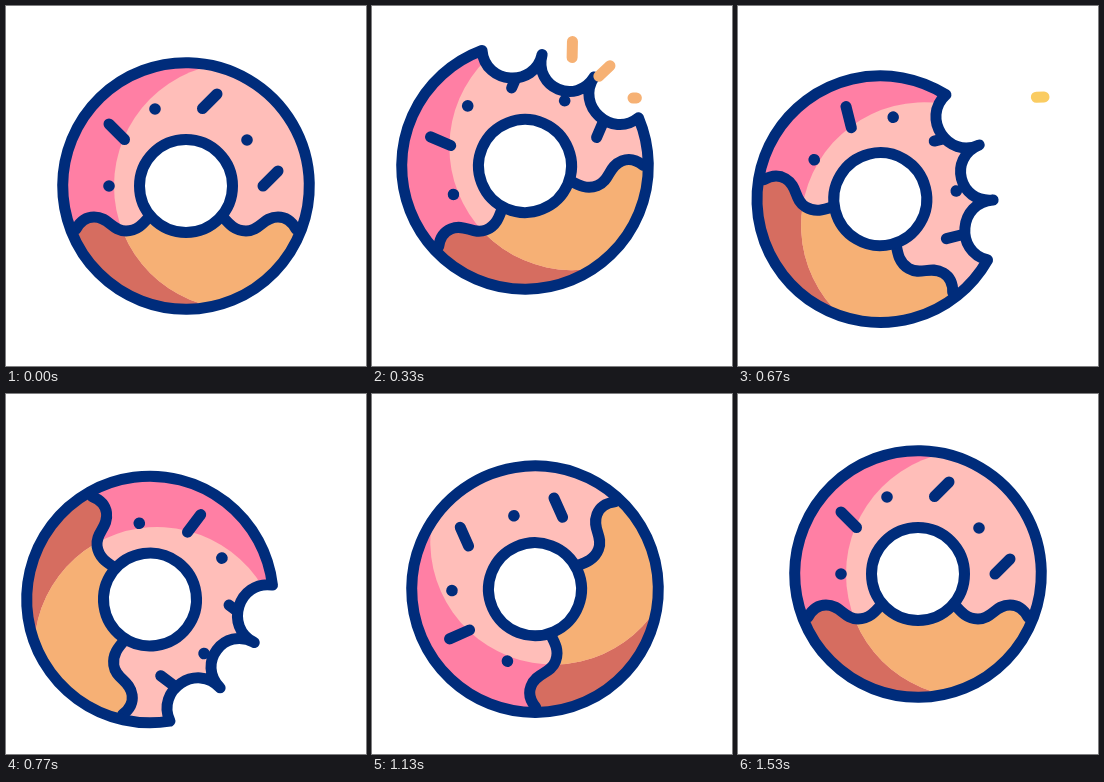
Write an HTML page that moves like this. It is 360 px wide and 360 px high and loops after 2000 ms.

```html
<!DOCTYPE html>
<html lang="en">
<head>
<meta charset="utf-8">
<title>Donut</title>
<style>
  html, body { margin: 0; width: 100%; height: 100%; overflow: hidden; background: #fff; }
  svg { display: block; width: 100vw; height: 100vh; }
  .line { fill: none; stroke: #002c7b; stroke-width: 11; stroke-linecap: round; stroke-linejoin: round; }
  .dots { fill: #002c7b; }
  .crumb { stroke-width: 11; stroke-linecap: round; }
</style>
</head>
<body>
<svg viewBox="0 0 360 360">
  <defs>
    <clipPath id="body"><path class="outline"/></clipPath>
    <clipPath id="lit"><circle cx="51" r="123"/></clipPath>
    <path id="dough" d="M-110 43C-105 34-99 31-92 31C-77 31-74 45-60 45C-49 45-43 38-37 31H37C43 38 49 45 60 45C74 45 77 31 92 31C99 31 105 34 110 43L130 130H-130Z"/>
    <path id="wave" d="M-110 43C-105 34-99 31-92 31C-77 31-74 45-60 45C-49 45-43 38-37 31"/>
  </defs>
  <g id="donut">
    <g clip-path="url(#body)">
      <circle r="130" fill="#ff7fa4"/>
      <use href="#dough" fill="#d66d60"/>
      <g clip-path="url(#lit)">
        <circle r="130" fill="#ffbeb9"/>
        <use href="#dough" fill="#f6b075"/>
      </g>
      <g class="line">
        <use href="#wave"/>
        <use href="#wave" transform="scale(-1 1)"/>
        <path d="M16.5-77.5L31-92M-77-62L-61.5-46.5M77 0L92-15"/>
      </g>
      <g class="dots">
        <circle cx="-31" cy="-77" r="5.8"/>
        <circle cx="61" cy="-46" r="5.8"/>
        <circle cx="-77" cy="0" r="5.8"/>
      </g>
    </g>
    <circle class="line" r="46.5" style="fill:#fff"/>
    <path class="line outline"/>
  </g>
  <g id="crumbs">
    <line class="crumb"/><line class="crumb"/><line class="crumb"/>
  </g>
</svg>
<script>
  const FPS = 30, LOOP = 2000, LAST = 46, R = 123.3;
  const donut = document.getElementById('donut');
  const crumbGroup = document.getElementById('crumbs');
  const crumbLines = [...crumbGroup.children];
  const outlines = document.querySelectorAll('.outline');

  // Keys are [frame, value].
  const xKeys = [[0, 180], [10, 153], [17, 144], [20, 142.3], [23, 144], [29, 152], [34, 163], [46, 180]];
  const yKeys = [[0, 180], [10, 160], [17, 177.5], [23, 205.5], [25, 206.2], [29, 203.7], [34, 195.2], [46, 180]];
  const turnKeys = [[0, 0], [10, -21.7], [17, -7.8], [23, 82], [29, 200], [34, 291], [46, 360]];

  const crumbs = [
    { from: [200, 58], to: [201, 8], start: 6.4 },
    { from: [225, 72], to: [262, 37], start: 7.2 },
    { from: [261, 92], to: [306, 91], start: 9.4 }
  ];

  const clamp = v => Math.min(1, Math.max(0, v));
  const lerp = (a, b, u) => a + (b - a) * u;
  const smooth = u => u * u * (3 - 2 * u);
  const ramp = (f, a, b) => clamp((f - a) / (b - a));

  // Smooth curve through the keys, at rest at both ends.
  function spline(keys, f) {
    const slope = i => {
      if (i === 0 || i === keys.length - 1) return 0;
      const [[a, p], [b, q], [c, r]] = keys.slice(i - 1, i + 2);
      return ((q - p) / (b - a) * (c - b) + (r - q) / (c - b) * (b - a)) / (c - a);
    };
    let i = 0;
    while (i < keys.length - 2 && f > keys[i + 1][0]) i++;
    const [a, p] = keys[i], [b, q] = keys[i + 1];
    const h = b - a, u = clamp((f - a) / h), v = 1 - u;
    return p * v * v * (1 + 2 * u) + q * u * u * (3 - 2 * u)
      + h * u * v * (slope(i) * v - slope(i + 1) * u);
  }

  // Ring outline whose upper right quarter bends into three bites.
  function outline(bite) {
    const nodes = [0, 1, 2, 3].map(i => {
      const a = (-88.7 + 29.13 * i) * Math.PI / 180;
      const r = i % 3 ? lerp(R, 112.8, bite) : R;
      return [r * Math.cos(a), r * Math.sin(a)];
    });
    const along = lerp(0.328, 0.087, bite), depth = lerp(-5.3, 34, bite);
    let d = `M${nodes[0]}`;
    for (let i = 0; i < 3; i++) {
      const [x, y] = nodes[i], [X, Y] = nodes[i + 1];
      const dx = X - x, dy = Y - y, len = Math.hypot(dx, dy);
      const nx = -dy / len * depth, ny = dx / len * depth;
      d += `C${x + dx * along + nx} ${y + dy * along + ny} ${X - dx * along + nx} ${Y - dy * along + ny} ${X} ${Y}`;
    }
    return `${d}A${R} ${R} 0 1 1 ${nodes[0]}Z`;
  }

  function drawCrumb(line, { from, to, start }, f) {
    const head = ramp(f, start, start + 8);
    const tail = ramp(f, start + 2.3, start + 12.3);
    line.style.display = head > 0 && tail < 1 ? '' : 'none';
    [tail, head].forEach((u, i) => {
      line.setAttribute(`x${i + 1}`, lerp(from[0], to[0], u));
      line.setAttribute(`y${i + 1}`, lerp(from[1], to[1], u));
    });
  }

  function draw(now) {
    // The motion steps at 30 pictures per second, then rests.
    const f = Math.min(LAST, Math.floor((now % LOOP + 4) * FPS / 1000));
    const x = spline(xKeys, f), y = spline(yKeys, f), turn = spline(turnKeys, f);
    donut.setAttribute('transform', `translate(${x} ${y}) rotate(${turn})`);

    const d = outline(smooth(ramp(f, 3, 8)) - smooth(ramp(f, 29, 33)));
    outlines.forEach(p => p.setAttribute('d', d));

    const tint = ramp(f, 9, 18);
    crumbGroup.setAttribute('stroke',
      `rgb(${lerp(246, 250, tint)} ${lerp(174, 204, tint)} ${lerp(118, 98, tint)})`);
    crumbs.forEach((c, i) => drawCrumb(crumbLines[i], c, f));
  }

  function tick() {
    draw(performance.now());
    requestAnimationFrame(tick);
  }
  tick();
</script>
</body>
</html>
```
